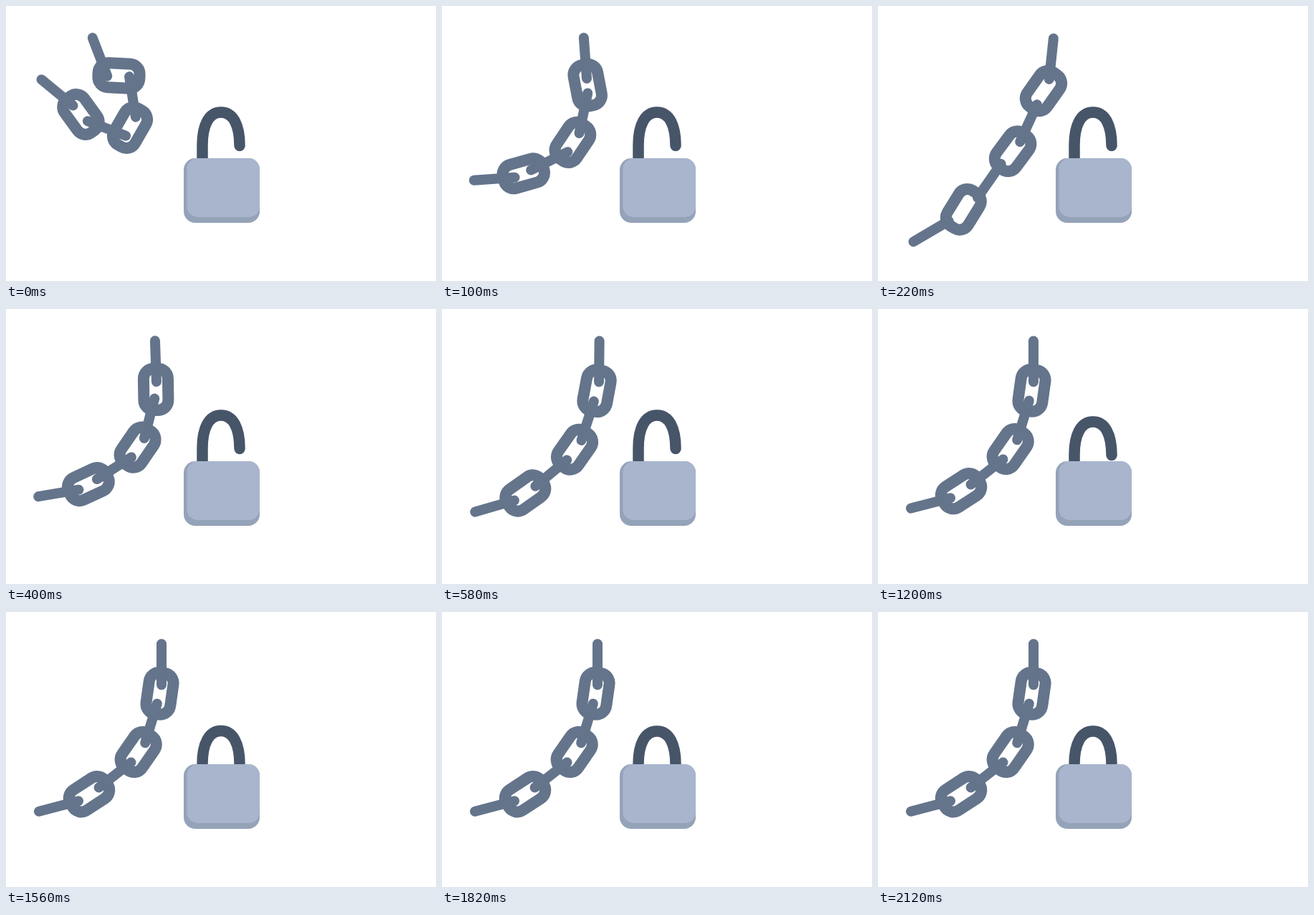
Recreate the animation shown at these times as an HTML page. Size 600 by 383 pixels, loop 2.22 s.

```html
<!DOCTYPE html>
<html lang="en">
<head>
<meta charset="utf-8">
<title>Chain and padlock</title>
<style>
html, body { margin: 0; width: 100%; height: 100%; overflow: hidden; background: #fff; }
svg { display: block; width: 100%; height: 100%; }
</style>
</head>
<body>
<svg viewBox="0 0 600 383">
  <g id="chain" fill="none" stroke="#64748b" stroke-linecap="round"></g>
  <path id="shackle" d="M274 230V194C274 166 283 148 300 148S326 166 326 194.500"
    fill="none" stroke="#475569" stroke-width="15.500" stroke-linecap="round"/>
  <rect x="248" y="212" width="106" height="90" rx="16" fill="#94a3b8"/>
  <rect x="252.500" y="212" width="101.500" height="82" rx="15" fill="#a8b5cd"/>
</svg>
<script>
const LOOP = 2220, LOCK_START = 1050, LOCK_DROP = 18;
const BAR = '<path d="M0-28.500V28.500" stroke-width="14"/>';
const LINK = '<rect x="-17" y="-29" width="34" height="58" rx="14" stroke-width="16"/>';

// [shape, folded pose, resting pose]; a pose is x, y, clockwise tilt
const parts = [
  [BAR, [131, 71, -21], [217, 73, 0]],
  [LINK, [157.5, 97, -87], [214.5, 113.5, 8]],
  [BAR, [176.5, 126.5, -9], [202.5, 155, 17]],
  [LINK, [173, 169.5, 30], [184.7, 195, 35]],
  [BAR, [140.5, 170.5, 111], [152, 227, 52]],
  [LINK, [104.5, 151, 144], [116, 253.7, 57]],
  [BAR, [71.5, 120.5, 129.4], [73.5, 270.5, 75.3]]
];

const chain = document.getElementById('chain');
const shackle = document.getElementById('shackle');
chain.innerHTML = parts.map(([shape]) => `<g>${shape}</g>`).join('');

// Underdamped spring: swings past the rest pose every 200 ms
function bounce(t) {
  const w = Math.PI / 200, k = 0.00592;
  return 1 - Math.exp(-k * t) * (Math.cos(w * t) + k / w * Math.sin(w * t));
}

// Critically damped spring
function settle(t) {
  const u = 0.0112 * Math.max(0, t);
  return 1 - (1 + u) * Math.exp(-u);
}

function draw(now) {
  const t = now % LOOP, p = bounce(t);
  parts.forEach(([, from, to], i) => {
    const [x, y, a] = from.map((v, j) => v + (to[j] - v) * p);
    chain.children[i].setAttribute('transform', `translate(${x} ${y}) rotate(${a})`);
  });
  shackle.setAttribute('transform', `translate(0 ${LOCK_DROP * settle(t - LOCK_START)})`);
}

const start = performance.now();
function tick() {
  draw(performance.now() - start);
  requestAnimationFrame(tick);
}
tick();
</script>
</body>
</html>
```
